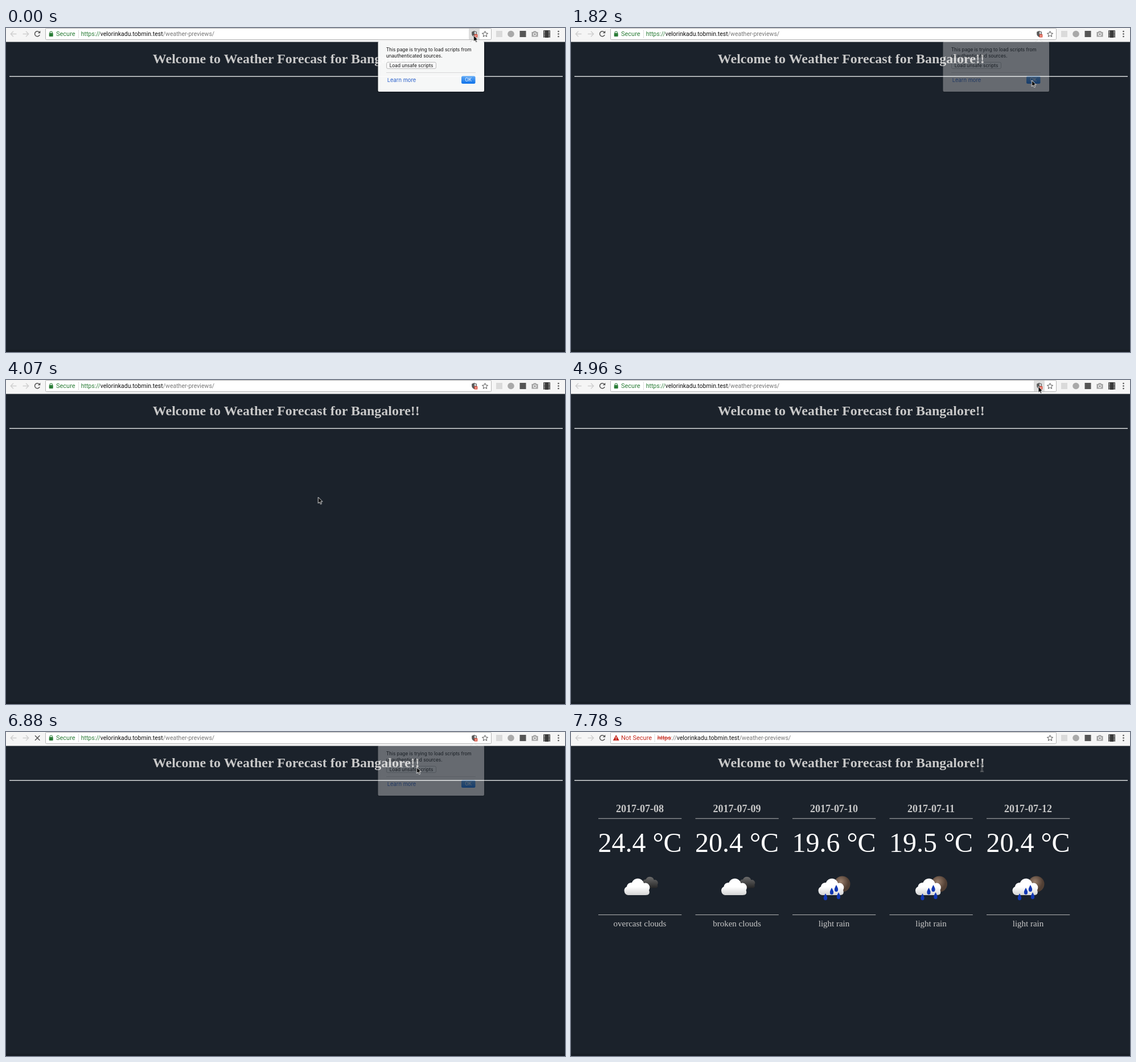
An HTML page for the animation above (8 s loop, 982 by 570 pixels).

```html
<!DOCTYPE html>
<html lang="en">
<head>
<meta charset="utf-8">
<title>Weather page</title>
<style>
  html, body { margin: 0; width: 100%; height: 100%; overflow: hidden; background: #1b222b; }
  svg { display: block; width: 982px; height: 570px; }
  text { white-space: pre; }
  .bar { font: 11px Roboto, sans-serif; }
  .url { font-size: 10.5px; fill: #777; }
  .host { fill: #111; }
  .ui { font: 8.25px Inter, sans-serif; fill: #111; }
  .page { font-family: "Liberation Serif", serif; fill: #c8c8c8; text-anchor: middle; }
  .title { font-size: 24px; font-weight: bold; }
  .date { font-size: 18px; font-weight: bold; }
  .temp { font-size: 48px; fill: #fff; }
  .sky { font-size: 15px; }

  .popup, .hover, .secure, .insecure, .reload, .stop, .weather, .arrow, .beam {
    animation: 8s step-end infinite;
  }
  .popup { animation-name: popup; }
  .hover { animation-name: hover; }
  .secure { animation-name: secure; }
  .insecure { animation-name: insecure; }
  .reload { animation-name: reload; }
  .stop { animation-name: stop; }
  .weather { animation-name: weather; }
  .arrow { animation-name: arrow; }
  .beam { animation-name: beam; }
  .pointer { animation: pointer 8s linear infinite; }

  @keyframes popup {
    0% { opacity: .975 } 1.875% { opacity: 1 }
    22.75% { opacity: .33 } 24.625% { opacity: 0 }
    71.25% { opacity: .955 } 73.125% { opacity: 1 }
    86% { opacity: .33 } 87.875%, 100% { opacity: 0 }
  }
  @keyframes hover {
    0% { opacity: 1 } 22.75% { opacity: 0 }
    62% { opacity: 1 } 86%, 100% { opacity: 0 }
  }
  @keyframes secure { 0% { opacity: 1 } 89.75%, 100% { opacity: 0 } }
  @keyframes insecure { 0% { opacity: 0 } 89.75%, 100% { opacity: 1 } }
  @keyframes reload { 0% { opacity: 1 } 86% { opacity: 0 } 97.25%, 100% { opacity: 1 } }
  @keyframes stop { 0% { opacity: 0 } 86% { opacity: 1 } 97.25%, 100% { opacity: 0 } }
  @keyframes weather { 0% { opacity: 0 } 95.375%, 100% { opacity: 1 } }
  @keyframes arrow { 0% { opacity: 1 } 87.875%, 100% { opacity: 0 } }
  @keyframes beam { 0% { opacity: 0 } 87.875%, 100% { opacity: .6 } }

  /* The pointer is sampled about every 150 ms, so each move is stepped. */
  @keyframes pointer {
    0% { transform: translate(821.5px, 13px) }
    5.875% { transform: translate(821.5px, 13px); animation-timing-function: steps(4, start) }
    13.375% { transform: translate(767px, 72px); animation-timing-function: steps(3, start) }
    19% { transform: translate(809.5px, 92px) }
    32.125% { transform: translate(809.5px, 92px); animation-timing-function: steps(3, start) }
    37.75% { transform: translate(503px, 238.5px) }
    50.875% { transform: translate(503px, 238.5px); animation-timing-function: steps(7, start) }
    63.85% { transform: translate(821px, 11.5px) }
    75% { transform: translate(821px, 11.5px); animation-timing-function: steps(5, start) }
    84.125%, 100% { transform: translate(721.5px, 62px) }
  }
</style>
</head>
<body>
<svg viewBox="0 0 982 570">
  <defs>
    <linearGradient id="white" x2="0" y2="1">
      <stop offset=".5" stop-color="#fff"/><stop offset="1" stop-color="#d4d4d4"/>
    </linearGradient>
    <linearGradient id="dark" x2="0" y2="1">
      <stop offset="0" stop-color="#6c6c6c"/><stop offset="1" stop-color="#262626"/>
    </linearGradient>
    <radialGradient id="ball" cx=".4" cy=".35">
      <stop offset="0" stop-color="#9a7f6c"/><stop offset="1" stop-color="#513f34"/>
    </radialGradient>
    <linearGradient id="blue" x2="0" y2="1">
      <stop offset="0" stop-color="#64aefa"/><stop offset="1" stop-color="#0d74f0"/>
    </linearGradient>
    <path id="cloud" d="M-21 17a8 8 0 0 1-2-15a8 8 0 0 1 9-7a11 11 0 0 1 21 1a8 8 0 0 1 9 12q3 9-6 9z"/>
    <path id="drop" d="M0-6Q4 1 3 3A3 3 0 0 1-3 3Q-4 1 0-6z" fill="#1238b4"/>
    <g id="cloudy">
      <use href="#cloud" transform="translate(20 -7) scale(.68)" fill="url(#dark)"/>
      <use href="#cloud" fill="url(#white)"/>
    </g>
    <g id="rain">
      <circle cx="14.5" cy="-2.5" r="14" fill="url(#ball)"/>
      <use href="#cloud" fill="url(#white)"/>
      <use href="#drop" x="-15" y="20"/>
      <use href="#drop" x="-4" y="10"/>
      <use href="#drop" x="8" y="18"/>
      <use href="#drop" x="4" y="5" />
    </g>
  </defs>

  <rect width="982" height="570" fill="#1b222b"/>
  <rect y="566" width="982" height="4" fill="#171d25"/>
  <text class="page title" x="492.3" y="62">Welcome to Weather Forecast for Bangalore!!</text>
  <rect x="6" y="84.5" width="972" height="1.5" fill="#d5d8da"/>
  <g class="weather page" id="days"></g>

  <!-- toolbar -->
  <rect width="982" height="24.5" fill="#f5f5f5"/>
  <rect x="69.5" y=".5" width="783" height="20" rx="2" fill="#fff" stroke="#b4b4b4"/>
  <g fill="none" stroke="#cfcfcf" stroke-width="1.4">
    <path d="M18.5 10.5H8.5M13 5.8L8.3 10.5L13 15.2"/>
    <path d="M29.5 10.5H39.5M35 5.8L39.7 10.5L35 15.2"/>
  </g>
  <g class="reload" fill="none" stroke="#555" stroke-width="1.5">
    <path d="M59.2 12A4.5 4.5 0 1 1 58.3 7.2"/>
    <path d="M60.3 4.8V9.3H55.8z" fill="#555" stroke="none"/>
  </g>
  <path class="stop" d="M51 6.3L59.4 14.7M59.4 6.3L51 14.7" stroke="#555" stroke-width="1.5"/>

  <g class="secure">
    <rect x="75.7" y="9" width="7" height="6" rx=".8" fill="#2b7d37"/>
    <path d="M77.2 9.5V8a2 2 0 0 1 4 0V9.5" fill="none" stroke="#2b7d37" stroke-width="1.2"/>
    <text class="bar" x="88" y="14" fill="#2b7d37">Secure</text>
    <path d="M127.5 3V18" stroke="#ddd"/>
    <text class="bar url" x="131.7" y="14"><tspan fill="#2b7d37">https://</tspan><tspan class="host">velorinkadu.tobmin.test</tspan>/weather-previews/</text>
    <rect class="hover" x="813" y="1" width="19" height="19" fill="#dedede"/>
    <path d="M822.5 5L827 6.7V10.5Q826.5 14.2 822.5 16Q818.5 14.2 818.2 10.5V6.7z" fill="#5a5a5a"/>
    <path d="M822.8 6.3L826 7.5V10.5H822.8z" fill="#d8d8d8"/>
    <rect x="822.7" y="11" width="5.6" height="5.6" rx=".6" fill="#d9503f"/>
    <path d="M824.2 12.5L826.8 15.1M826.8 12.5L824.2 15.1" stroke="#fff" stroke-width=".8"/>
  </g>
  <g class="insecure">
    <path d="M79.2 5L84.7 15H73.7z" fill="#c5281c"/>
    <path d="M79.2 8.2V11.6M79.2 12.5V13.7" stroke="#fff" stroke-width="1.1"/>
    <text class="bar" x="88" y="14" fill="#c5281c">Not Secure</text>
    <path d="M147 3V18" stroke="#ddd"/>
    <text class="bar url" x="151.7" y="14"><tspan fill="#c5281c" text-decoration="line-through">https</tspan>://<tspan class="host">velorinkadu.tobmin.test</tspan>/weather-previews/</text>
  </g>

  <path d="M841.5 5.5L843 9L846.6 9.3L843.9 11.7L844.7 15.2L841.5 13.3L838.3 15.2L839.1 11.7L836.4 9.3L840 9z" fill="none" stroke="#555"/>
  <rect x="861" y="5" width="11" height="11" fill="#dadada"/>
  <circle cx="887" cy="10.5" r="5.8" fill="#a9a9a9"/>
  <rect x="902.5" y="5" width="11" height="11" fill="#555"/>
  <path d="M923.5 7H926L927 5.5H931L932 7H934.5V15.5H923.5z" fill="#a2a2a2"/>
  <circle cx="929" cy="11" r="2.5" fill="none" stroke="#f5f5f5" stroke-width="1.2"/>
  <rect x="944" y="4" width="12" height="13" rx="1" fill="#3a3a3a"/>
  <path d="M945.8 5V17M954.2 5V17" stroke="#eee" stroke-width="1.4" stroke-dasharray="1.4 1.2"/>
  <g fill="#555">
    <circle cx="970.5" cy="6" r="1.3"/><circle cx="970.5" cy="10.5" r="1.3"/><circle cx="970.5" cy="15" r="1.3"/>
  </g>

  <g class="popup">
    <rect x="652" y="25" width="189.5" height="88.5" rx="3" fill="#000" opacity=".18"/>
    <path d="M655 24H817L822 19.8L827 24H838.5a1.5 1.5 0 0 1 1.5 1.5V110a2 2 0 0 1-2 2H655.5a2 2 0 0 1-2-2V25.5a1.5 1.5 0 0 1 1.5-1.5z" fill="#fdfdfd"/>
    <path d="M815 24L817 23.7L822 19.6L827 23.7L829 24" fill="none" stroke="#c4c4c4" stroke-width=".7"/>
    <text class="ui" x="667.7" y="41">This page is trying to load scripts from</text>
    <text class="ui" x="667.7" y="51.5">unauthenticated sources.</text>
    <rect x="668.5" y="60.2" width="87" height="11.3" rx="2.5" fill="#fff" stroke="#b9b9b9" stroke-width=".9"/>
    <text class="ui" x="712" y="69" text-anchor="middle">Load unsafe scripts</text>
    <path d="M668 78.5H825" stroke="#ddd"/>
    <text class="ui" x="669.7" y="95" style="font-size:9.4px;fill:#2a62d0">Learn more</text>
    <rect x="800" y="84.5" width="24.5" height="13.5" rx="2.5" fill="url(#blue)"/>
    <text class="ui" x="812.2" y="94.3" text-anchor="middle" style="fill:#fff">OK</text>
  </g>

  <g class="pointer">
    <path class="arrow" d="M0 0V10.8L2.5 8.6L4.2 12.4L6 11.6L4.4 7.9H7.6z" fill="#000" stroke="#fff" stroke-width=".9"/>
    <g class="beam" fill="none">
      <path d="M-2-6L.5-4.5L3-6M.5-4.5V7M-2 8L.5 6.5L3 8" stroke="#fff" stroke-width="2"/>
      <path d="M-2-6L.5-4.5L3-6M.5-4.5V7M-2 8L.5 6.5L3 8" stroke="#222" stroke-width=".9"/>
    </g>
  </g>
</svg>
<script>
  const days = [
    ["08", "24.4", "overcast clouds", "cloudy"],
    ["09", "20.4", "broken clouds", "cloudy"],
    ["10", "19.6", "light rain", "rain"],
    ["11", "19.5", "light rain", "rain"],
    ["12", "20.4", "light rain", "rain"]
  ];
  document.getElementById("days").innerHTML = days.map(([day, temp, sky, icon], i) => `
    <g transform="translate(${121 + i * 170.5} 0)">
      <text class="date" y="141">2017-07-${day}</text>
      <path d="M-73 152.2H73.3M-73 321.6H73.3" stroke="#c8c8c8" stroke-width=".9"/>
      <text class="temp" y="211">${temp} °C</text>
      <use href="#${icon}" y="270"/>
      <text class="sky" y="341.5">${sky}</text>
    </g>`).join("");
</script>
</body>
</html>
```
